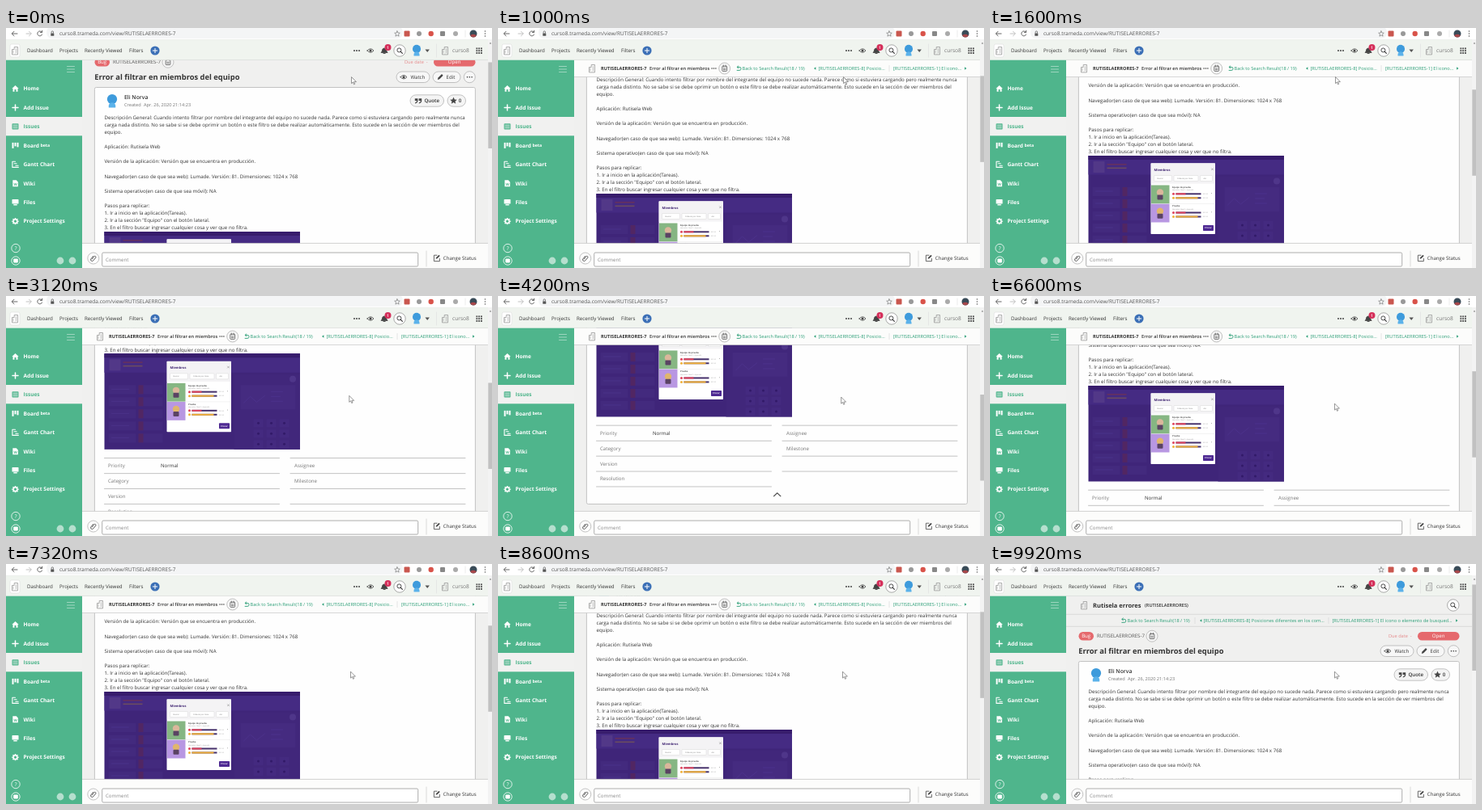
Recreate the animation shown at these times as an HTML page. Size 600x297 px, loop 10 s.

```html
<!DOCTYPE html>
<html lang="es">
<head>
<meta charset="utf-8">
<style>
html, body { margin: 0; width: 100%; height: 100%; overflow: hidden; background: #f0f0ef; }
svg { display: block; width: 100%; height: 100%; }
text { font-family: "Open Sans", "Noto Sans", sans-serif; text-rendering: geometricPrecision; white-space: pre; }
</style>
</head>
<body>
<svg id="stage" viewBox="0 0 600 297" xmlns="http://www.w3.org/2000/svg"></svg>
<script>
const GREEN = '#4fb58c', LINK = '#2d9f78', INK = '#333', GREY = '#777', LINE = '#c4c4c4', RED = '#e5696d', BLUE = '#3e9bdc';
const KEY = 'RUTISELAERRORES';

// Drawing helpers; text is placed by its vertical centre.
const text = (x, y, s, size = 6.13, fill = INK, weight = 400, anchor = 'start') =>
  `<text x="${x}" y="${y + size * 0.35}" font-size="${size}" fill="${fill}" font-weight="${weight}" text-anchor="${anchor}">${s}</text>`;
const rect = (x, y, w, h, fill, r = 0, stroke = 'none', sw = 0.6) =>
  `<rect x="${x}" y="${y}" width="${w}" height="${h}" rx="${r}" fill="${fill}" stroke="${stroke}" stroke-width="${sw}"/>`;
const circle = (x, y, r, fill, stroke = 'none', sw = 0.7) =>
  `<circle cx="${x}" cy="${y}" r="${r}" fill="${fill}" stroke="${stroke}" stroke-width="${sw}"/>`;
const path = (d, stroke = INK, sw = 0.8, fill = 'none') =>
  `<path d="${d}" fill="${fill}" stroke="${stroke}" stroke-width="${sw}" stroke-linecap="round" stroke-linejoin="round"/>`;
const hline = (x1, x2, y, color = LINE, sw = 0.7) => path(`M${x1} ${y}H${x2}`, color, sw);
const dots = (x, y, gap = 3, r = 0.9, fill = INK) =>
  [-1, 0, 1].map(i => circle(x + i * gap, y, r, fill)).join('');
const at = (x, y, body) => `<g transform="translate(${x} ${y})">${body}</g>`;

// Icons centred on their origin
const building = (x, y) => at(x, y,
  path('M-3.5 4.5V-1.5H-.8V-4.5H3.5V4.5Z', '#999', 0.8) + path('M1.4 -2.5V3M-2 0V3', '#aaa', 0.8));
const magnifier = (x, y) => circle(x, y, 7.2, '#fff', '#888') +
  at(x, y, circle(-0.6, -0.6, 2.5, 'none', INK, 0.9) + path('M1.3 1.3L3.4 3.4', INK, 1.1));
const eye = (x, y) => at(x, y, path('M-4 0Q0 -4.6 4 0Q0 4.6 -4 0Z', '#444', 0.8) + circle(0, 0, 1.5, '#444'));
const calendar = (x, y) => circle(x, y, 7, '#f6f6f6', '#aaa') +
  at(x, y, rect(-2.9, -2.8, 5.8, 6.2, 'none', 0.8, '#555', 0.8) + path('M-1.4 -4V-2M1.4 -4V-2M-1.3 0H1.3M-1.3 1.6H1.3', '#555', 0.7));
const avatar = (x, y, k) => at(x, y, `<g transform="scale(${k})">` +
  circle(0, -1.4, 4.4, BLUE) + path('M-3 6Q-3.6 2 0 1.6Q3.6 2 3 6Z', 'none', 0, '#5bb2ea') + '</g>');
const pencil = (x, y) => at(x, y, path('M-3.2 3.2L-2.5 .8L2 -3.6L3.6 -2L-.8 2.5Z', 'none', 0, '#444'));
const back = (x, y, color) => at(x, y,
  path('M-2.2 2.4H.8A2 2 0 0 0 .8 -1.6H-2M-.6 -3L-2.2 -1.6L-.6 -.2', color, 0.9));
const arrow = (x, y, dir) => path(`M${x} ${y}l${-dir * 2.4} -1.8v3.6z`, 'none', 0, LINK);

function browserBar() {
  return rect(0, 0, 600, 14, '#fff') + rect(50, -2, 440, 15, '#f4f5f6', 7) +
    path('M14 7H7.5M10 4.2L7.2 7L10 9.8', '#555', 0.9) +
    path('M25 7H31M28.5 4.2L31.3 7L28.5 9.8', '#bbb', 0.9) +
    path('M44.2 5A3 3 0 1 0 44.6 8M44.6 3.2V5.4H42.4', '#555', 0.9) +
    rect(55.3, 6.4, 4, 3.4, '#555', 0.4) + path('M56.1 6.2V5A1.2 1.2 0 0 1 58.5 5V6.2', '#555', 0.7) +
    text(66, 7.2, `curso8.trameda.com/view/${KEY}-7`, 6.5, '#555') +
    path('M483 3.8l1 2.2 2.3.2-1.8 1.6.6 2.4-2.1-1.3-2.1 1.3.6-2.4-1.8-1.6 2.3-.2z', '#666', 0.6) +
    rect(491.5, 3.5, 7, 7, '#c9574f', 1) + circle(510, 7, 3, '#999') + circle(524.7, 7, 3.2, '#d9534a') +
    rect(536, 4, 6, 6, '#888', 1) + circle(555, 7, 3, '#aaa') + path('M567 3V11', '#ddd', 0.6) +
    circle(577, 7, 4.5, '#394b58') + path('M573.1 9.2Q576.5 6.5 580.9 9.2A4.5 4.5 0 0 1 573.1 9.2Z', 'none', 0, '#a8474b') +
    [4, 7, 10].map(y => circle(591.5, y, 0.75, '#555')).join('');
}

function navBar() {
  const items = [[26, 'Dashboard'], [66, 'Projects'], [97, 'Recently Viewed'], [152, 'Filters']];
  return rect(0, 14, 600, 25.5, '#f0f4ef') + hline(0, 600, 14, '#e2e2e2', 0.5) + hline(94, 600, 39.5, '#d5d9d5', 0.6) +
    rect(5, 20, 12, 16, '#fff', 2, '#ddd') + building(11, 28) +
    items.map(([x, s]) => text(x, 28, s, 6.2)).join('') +
    circle(188.5, 28, 5.6, '#3b6fb6').replace('188.5', '184') + path('M181.3 28H186.7M184 25.3V30.7', '#fff', 1) +
    dots(433, 28) + eye(450, 28) +
    path('M463.4 30.2Q464.6 29 464.6 27A2.6 2.8 0 0 1 469.6 27Q469.6 29 470.8 30.2ZM466 31.5H468.2', '#444', 0.9, '#444') +
    circle(471.5, 24, 4, '#d5305b') + text(471.5, 24, '1', 5, '#fff', 600, 'middle') +
    magnifier(486, 28) + avatar(507, 27.5, 1.15) + path('M517.5 26.6h5.4l-2.7 3.4z', 'none', 0, '#555') +
    path('M531.5 20V36', '#ddd', 0.6) + building(542, 28) + text(551, 28, 'curso8', 6.6, GREY) +
    [0, 1, 2].map(i => [0, 1, 2].map(j => rect(580.4 + i * 2.8, 24.4 + j * 2.8, 1.9, 1.9, '#555')).join('')).join('');
}

function sideBar() {
  const white = '#fff';
  const sheet = path('M-3.2 -4H1.2L3.4 -1.8V4H-3.2Z', 'none', 0, white);
  const items = [
    ['Home', path('M-4.2 0L0 -4L4.2 0H3V3.8H1V1H-1V3.8H-3V0Z', 'none', 0, white)],
    ['Add Issue', path('M-3.5 0H3.5M0 -3.5V3.5', white, 1.5)],
    ['Issues', rect(-4, -3.7, 8, 7.4, GREEN, 0.8) + path('M-2.6 -1.8H2.6M-2.6 0H2.6M-2.6 1.8H2.6', '#f1f1f1', 0.7)],
    ['Board', rect(-4, -3.5, 2, 7, white) + rect(-1, -3.5, 2, 4.5, white) + rect(2, -3.5, 2, 5.5, white)],
    ['Gantt Chart', path('M-3.6 -3.6V3.6H3.8M-3.6 -3.6H0M-1.4 -1H1.6M.4 1.4H3.6', white, 1.1)],
    ['Wiki', sheet + text(0, 0.8, 'W', 4.4, GREEN, 700, 'middle')],
    ['Files', rect(-4, -3.6, 8, 5.4, white, 0.6) + rect(-2.2, 2.4, 4.4, 1.4, white)],
    ['Project Settings', circle(0, 0, 2.4, 'none', white, 1.6) +
      [0, 45, 90, 135].map(a => `<path d="M0 -4.2V-3M0 3V4.2" stroke="#fff" stroke-width="1.5" transform="rotate(${a})"/>`).join('')]
  ];
  return rect(0, 39.4, 94, 257.6, GREEN) + [47.5, 51, 54.5].map(y => hline(75.5, 84.5, y, '#a5dac5', 0.9)).join('') +
    rect(0, 110, 94, 23.3, '#f1f1f0') +
    items.map(([s, icon], i) => {
      const y = 75 + i * 23.45;
      return at(11.5, y, icon) + text(21.5, y, s, 6.56, i === 2 ? GREEN : white, 700);
    }).join('') +
    text(42.5, 144.8, 'beta', 5.2, white, 700) +
    circle(12, 272.5, 5.2, 'none', white, 0.8) + text(12, 272.5, '?', 6.4, white, 400, 'middle') +
    circle(12, 288, 5.2, 'none', white, 0.8) + rect(9.2, 285.6, 5.6, 4.8, white, 0.8) +
    circle(67, 288, 4.4, '#b5dfce') + circle(82, 288, 4.4, '#b5dfce');
}

function screenshot() {
  const member = (y, bg, tone, name) => rect(77.5, y, 22.5, 22.8, bg) +
    circle(88.5, y + 9, 4.2, tone) + rect(85, y + 12, 7, 6, '#5a4363', 1) +
    text(103.5, y + 2.8, name, 2.7, INK, 600) + text(103.5, y + 6.2, '@prueba  Nivel 5  Aprendiz', 2.1, '#999') +
    ['#e0455e', '#f0b13c'].map((c, i) => {
      const by = y + 9.8 + i * 5;
      return circle(105, by + 1, 1.5, c) + rect(108, by, 31, 2, '#46316b') + rect(108, by, i ? 27 : 12, 2, c) +
        text(141, by + 1, '30 / 50', 2, '#999');
    }).join('') + circle(152, y + 10, 0.5, '#999');
  const tiles = [];
  for (let i = 0; i < 3; i++) for (let j = 0; j < 3; j++)
    tiles.push(rect(184 + i * 16, 81 + j * 13, 12, 10, '#442a80', 1) + circle(190 + i * 16, 86 + j * 13, 1.5, '#321a68'));
  const tasks = [0, 1, 2, 3, 4].map(i =>
    rect(5, 39 + i * 15, 34, 11, '#432a7e') + rect(42, 39 + i * 15, 30, 11, '#432a7e') +
    rect(42, 39 + i * 15, 6, 11, '#512663') + hline(9, 30, 44 + i * 15, '#503890', 0.6)).join('');
  return rect(0, 0, 241.5, 118.5, '#3f2579') + rect(0, 0, 241.5, 23.5, '#452b83') +
    rect(0, 0, 241.5, 5, '#371c6c') + rect(6, 7, 14, 14, '#523888') + rect(23, 10, 24, 1.6, '#66305f') + rect(23, 14.5, 24, 1.6, '#6b4c60') +
    tasks + rect(160, 26, 81.5, 92.5, '#41277b') + rect(168, 39, 68, 30, '#452b80') +
    path('M172 61l8 -8l8 7l10 -8M206 47h14M206 53h11M206 59h14', '#4f3690', 0.7) + tiles.join('') +
    circle(232.5, 31.5, 4, '#4f368a') +
    rect(77, 9.3, 79.5, 87.7, '#fff', 0.8) + rect(77.3, 9.6, 78.9, 25, '#f4f3f5') + text(81, 17.5, 'Miembros', 4, '#432874', 700) +
    path('M152 15.7l2 2m0 -2l-2 2', '#777', 0.5) +
    [[81, 22, 'Buscar'], [105.5, 30, 'Ordenar por clase'], [138, 15, 'Asc']].map(([x, w, s]) =>
      rect(x, 24.5, w, 7, '#fff', 0.6, '#ccc', 0.4) + text(x + 4, 28, s, 2.3, '#777')).join('') +
    member(36.5, '#86b683', '#dbb79b', 'Equipo de prueba') + hline(100, 155, 59.5, '#ddd', 0.4) +
    member(59.7, '#b897e2', '#e0b66c', 'Prueba') +
    rect(141.5, 86, 13, 7, '#4f2a93', 0.8) + text(148, 89.5, 'Enviar', 2.8, '#fff', 600, 'middle');
}

function page() {
  const lines = [
    'Descripción General: Cuando intento filtrar por nombre del integrante del equipo no sucede nada. Parece como si estuviera cargando pero realmente nunca',
    'carga nada distinto. No se sabe si se debe oprimir un botón o este filtro se debe realizar automáticamente. Esto sucede en la sección de ver miembros del',
    'equipo.', '', 'Aplicación: Rutisela Web', '',
    'Versión de la aplicación: Versión que se encuentra en producción.', '',
    'Navegador(en caso de que sea web): Lumade. Versión: 81. Dimensiones: 1024 x 768', '',
    'Sistema operativo(en caso de que sea móvil): NA', '', 'Pasos para replicar:',
    '1. Ir a inicio en la aplicación(Tareas).',
    '2. Ir a la sección "Equipo" con el botón lateral.',
    '3. En el filtro buscar ingresar cualquier cosa y ver que no filtra.'
  ];
  const pill = (x, y, w, h, fill = '#f7f7f7') => rect(x, y, w, h, fill, h / 2, '#aaa', 0.7);
  const fields = ['Priority', 'Category', 'Version', 'Resolution'].map((s, i) =>
    text(126, 438 + i * 18.8, s, 6.13, GREY) + hline(121.5, 337.5, 447.3 + i * 18.9, '#aaa')).join('') +
    ['Assignee', 'Milestone', ''].map((s, i) =>
      text(356, 438 + i * 18.8, s, 6.13, GREY) + hline(351, 567, 447.3 + i * 18.9, '#aaa')).join('');
  return building(116, 51) + text(127, 51, 'Rutisela errores', 7.5, INK, 700) + text(191, 51, `(${KEY})`, 5.63, INK, 600) +
    magnifier(571.8, 51) + hline(94, 595, 62.3, '#d2d2d2') +
    back(165, 70, LINK) + text(169.5, 70, 'Back to Search Result(18 / 19)', 5.63, LINK) +
    path('M253 66.5V73.5M418 66.5V73.5', '#ccc', 0.5) + arrow(259, 70, -1) +
    text(263.5, 70, `[${KEY}-8] Posiciones diferentes en los com...`, 5.63, LINK) +
    text(422.5, 70, `[${KEY}-1] El icono o elemento de busqued...`, 5.63, LINK) + arrow(577.5, 70, 1) +
    hline(94, 595, 77.3, '#d2d2d2') +
    rect(109.5, 84, 18.5, 10.5, RED, 5.2) + text(118.7, 89.2, 'Bug', 6.13, '#fff', 400, 'middle') +
    text(132, 89.2, `${KEY}-7`, 6.13, '#555') + calendar(200, 89.2) +
    text(492, 89.5, 'Due date  -', 5.63, '#e58a8c') + rect(528, 84, 51.5, 10.5, RED, 5.2) +
    text(553.7, 89.2, 'Open', 6.13, '#fff', 400, 'middle') +
    text(109.3, 107.5, 'Error al filtrar en miembros del equipo', 9.35, INK, 700) +
    pill(482, 101, 41, 13.5) + eye(491, 107.7) + text(499.5, 107.7, 'Watch') +
    pill(527, 101, 34, 13.5) + pencil(536, 107.7) + text(543.5, 107.7, 'Edit') +
    circle(572.3, 107.7, 7, '#f7f7f7', '#aaa') + dots(572.3, 107.7, 2.8, 0.8) +
    rect(109.4, 120.5, 470, 405, '#fefefe', 2, '#bdbdbd', 0.9) +
    avatar(131, 137, 1.4) + text(146, 132.5, 'Eli Norva', 6.8, INK, 600) +
    text(146, 142, 'Created', 5.63, GREY) + text(170, 142, 'Apr. 26, 2020 21:14:23', 5.63, GREY) +
    pill(499, 129.8, 41.5, 14.4, '#f4f4f4') +
    path('M505 139.6q2.2 -.8 2.2 -2.6h-2.4v-2.8h3.6v3q0 2.4 -3.4 3.2zM509.8 139.6q2.2 -.8 2.2 -2.6h-2.4v-2.8h3.6v3q0 2.4 -3.4 3.2z', 'none', 0, '#444') +
    text(516.5, 137, 'Quote', 6.2, INK, 600) + pill(545, 129.8, 22.5, 14.4, '#f4f4f4') +
    path('M552.5 132.6l1.3 2.8 3 .3-2.3 2 .7 3-2.7-1.6-2.7 1.6.7-3-2.3-2 3-.3z', 'none', 0, '#444') +
    text(558.8, 137, '0', 6.2, INK, 600) +
    lines.map((s, i) => s && text(121.5, 157.7 + i * 9.1, s)).join('') +
    at(121.5, 299, screenshot()) +
    hline(121.5, 337.5, 428.2, '#aaa') + hline(351, 567, 428.2, '#aaa') + fields + text(191, 438, 'Normal') +
    path('M340.5 515.8L344.7 511.8L348.9 515.8', '#555', 1.1);
}

function stickyBar() {
  return rect(94, 39.5, 501, 21, '#fcfcfb') + hline(94, 595, 60.5, '#c8c8c8') +
    building(116, 50) + text(127, 50, `${KEY}-7`, 5.63, INK, 700) +
    text(187, 50, 'Error al filtrar en miembros', 5.63, INK, 600) + dots(266.5, 50, 2.4, 0.75) + calendar(279.7, 50) +
    back(297.3, 50, LINK) + text(301.5, 50, 'Back to Search Result(18 / 19)', 5.63, LINK) +
    arrow(390, 50, -1) + text(395.5, 50, `[${KEY}-8] Posicio...`, 5.63, LINK) + path('M483 46.5V53.5', '#ccc', 0.5) +
    text(488, 50, `[${KEY}-1] El icono...`, 5.63, LINK) + arrow(578.5, 50, 1);
}

function commentBar() {
  return rect(94, 266.3, 501, 31, '#fcfcfb') + hline(94, 595, 266.4, '#c2c2c2') +
    circle(107.8, 285, 7, '#fff', '#aaa') +
    at(107.8, 285, `<g transform="rotate(40)">${path('M-1.8 -2V2.2A1.8 1.8 0 0 0 1.8 2.2V-2.6A1.3 1.3 0 0 0 -.7 -2.6V1.8', '#444', 0.8)}</g>`) +
    rect(118.7, 278, 390, 17, '#fff', 1.5, '#999', 0.8) + text(123, 286.5, 'Comment', 6.13, '#888') +
    path('M519 276V295', '#ccc', 0.7) +
    path('M532 281.2H528.4V288.6H535.4V285.4', '#444', 0.8) + at(533, 283.4, `<g transform="scale(.75)">${pencil(0, 0)}</g>`) +
    text(539.8, 284.4, 'Change Status');
}

const stage = document.getElementById('stage');
stage.innerHTML = `<defs><clipPath id="view"><rect x="94" y="39.5" width="501" height="227"/></clipPath></defs>` +
  rect(0, 0, 600, 297, '#f0f0ef') +
  `<g clip-path="url(#view)"><g id="page">${page()}</g></g><g id="sticky">${stickyBar()}</g>` +
  commentBar() + sideBar() + navBar() + browserBar() +
  rect(595, 14, 5, 283, '#f3f3f3') + path('M596.8 19.4l1.2 -1.6l1.2 1.6z', 'none', 0, '#777') +
  `<g id="thumb">${rect(595.3, 0, 4.7, 106.5, '#c1c1c1')}</g>` +
  `<g id="cursor">${path('M0 0V7.6L1.8 6L3 8.8L4.2 8.3L3.1 5.6H5.5Z', '#555', 0.6, '#fff')}</g>`;
const [pageEl, stickyEl, thumbEl, cursorEl] = ['page', 'sticky', 'thumb', 'cursor'].map(id => document.getElementById(id));

const LOOP = 10000, NOTCH = 47;
const wheel = [[500, 1], [1100, 1], [2100, 1], [3000, 1], [4110, 1],
  [5200, -1], [6200, -1], [6800, -1], [8000, -1], [9000, -1], [9500, -1]];
const progress = (t, start, length) => Math.min(1, Math.max(0, (t - start) / length));
const easeOut = p => 1 - (1 - p) * (1 - p);
const smooth = p => p * p * (3 - 2 * p);
const move = (el, x, y) => el.setAttribute('transform', `translate(${x} ${y})`);

function draw(t) {
  const scroll = wheel.reduce((sum, [start, dir]) => sum + dir * NOTCH * easeOut(progress(t, start, 200)), NOTCH);
  const drift = smooth(progress(t, 2400, 800)), settle = smooth(progress(t, 4500, 500));
  move(pageEl, 0, -scroll);
  move(thumbEl, 0, 25.5 + scroll * 0.36);
  move(cursorEl, 426.5 - 2.8 * drift + 1.8 * settle, 61 + 64.5 * drift + 8 * settle);
  stickyEl.style.display = scroll > 70 ? '' : 'none';
}

const begin = performance.now();
function tick() {
  draw((performance.now() - begin) % LOOP);
  requestAnimationFrame(tick);
}
tick();
</script>
</body>
</html>
```
